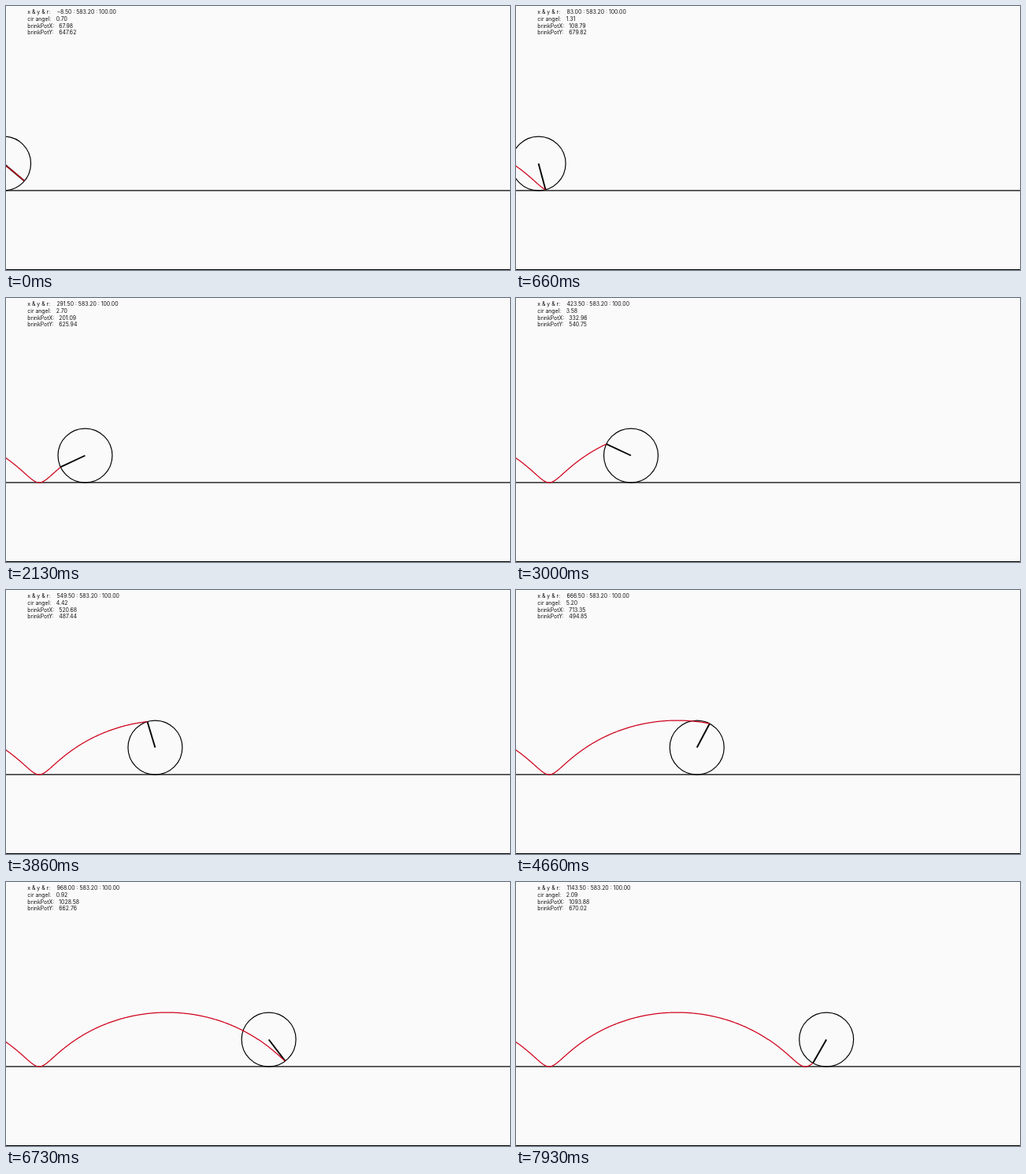
An HTML page that plays this animation: 640x336 px, repeating every 8000 ms.

```html
<!DOCTYPE html>
<html lang="en">
<head>
<meta charset="utf-8">
<title>Rolling circle</title>
<style>
  html, body { margin: 0; width: 100%; height: 100%; overflow: hidden; background: #fafafa; }
  svg { display: block; width: 640px; height: 336px; }
  text { font: 6.9px Inter, Roboto, sans-serif; fill: #111; white-space: pre; }
  .ink { fill: none; stroke: #000; stroke-width: 1.2; }
  #spoke { stroke-width: 1.9; }
  #trail { fill: none; stroke: #d0021b; stroke-width: 1.25; stroke-linejoin: round; }
</style>
</head>
<body>
<svg viewBox="0 0 640 336">
  <path class="ink" d="M0 234.9H640M0 335.5H640"/>
  <circle id="wheel" class="ink" cy="200.5" r="34.47"/>
  <line id="spoke" class="ink" y1="200.5"/>
  <path id="trail"/>
  <g id="labels"></g>
</svg>
<script>
const LOOP = 8000;
const SCALE = 0.3447, OFFSET_Y = -0.53;
const RADIUS = 100, CENTER_Y = 583.2;
const START_X = -8.5, STEP_X = 1.5;
const START_ANGLE = 0.7, STEP_ANGLE = 0.01, WRAP_STEP = 559;

// [tick, simulation steps done]; 15 ticks per second
const PACE = [[0, 0], [20, 122], [26, 160], [45, 288], [70, 450], [87, 562], [101, 651], [119, 768]];

const byId = id => document.getElementById(id);
const wheel = byId('wheel'), spoke = byId('spoke'), trail = byId('trail');

function set(node, attrs) {
  for (const key in attrs) node.setAttribute(key, attrs[key]);
  return node;
}

function addText(x, y, content) {
  const node = document.createElementNS('http://www.w3.org/2000/svg', 'text');
  node.textContent = content;
  return byId('labels').appendChild(set(node, { x, y }));
}

const values = [
  ['x & y & r:', 64.4], ['cir angel:', 63.7], ['brinkPotX:', 67.3], ['brinkPotY:', 67.3]
].map(([label, valueX], row) => {
  const y = 10.3 + row * 8.62;
  addText(27.3, y, label);
  return addText(valueX, y, '');
});

const fixed = n => n.toFixed(2).replace('-', '\u2212');
const toX = x => x * SCALE;
const toY = y => y * SCALE + OFFSET_Y;

function stateAt(step) {
  const x = START_X + STEP_X * step;
  // the angle restarts at exactly zero after a full turn
  const angle = step < WRAP_STEP
    ? START_ANGLE + STEP_ANGLE * step
    : STEP_ANGLE * (step - WRAP_STEP);
  return {
    x, angle,
    brinkX: x + RADIUS * Math.cos(angle),
    brinkY: CENTER_Y + RADIUS * Math.sin(angle)
  };
}

function stepsAt(tick) {
  const i = Math.max(1, PACE.findIndex(([t]) => t >= tick));
  const [t0, s0] = PACE[i - 1], [t1, s1] = PACE[i];
  return Math.round(s0 + (s1 - s0) * (tick - t0) / (t1 - t0));
}

function trailPath(lastStep) {
  const points = [];
  for (let step = -70; step <= lastStep; step++) {
    const { brinkX, brinkY } = stateAt(step);
    points.push(toX(brinkX).toFixed(2) + ' ' + toY(brinkY).toFixed(2));
  }
  return 'M' + points.join('L');
}

function draw(step) {
  const { x, angle, brinkX, brinkY } = stateAt(step);
  set(wheel, { cx: toX(x) });
  set(spoke, { x1: toX(x), x2: toX(brinkX), y2: toY(brinkY) });
  set(trail, { d: trailPath(step) });
  [
    [x, CENTER_Y, RADIUS].map(fixed).join(' : '),
    fixed(angle), fixed(brinkX), fixed(brinkY)
  ].forEach((value, i) => { values[i].textContent = value; });
}

const start = performance.now();
let shownTick = -1;

function play(now) {
  const time = Math.max(0, now - start) % LOOP;
  // ticks begin on whole hundredths of a second
  const hundredths = Math.floor(time / 10);
  const tick = Math.ceil((hundredths + 1) * 3 / 20) - 1;
  if (tick !== shownTick) {
    shownTick = tick;
    draw(stepsAt(tick));
  }
  requestAnimationFrame(play);
}

play(start);
</script>
</body>
</html>
```
